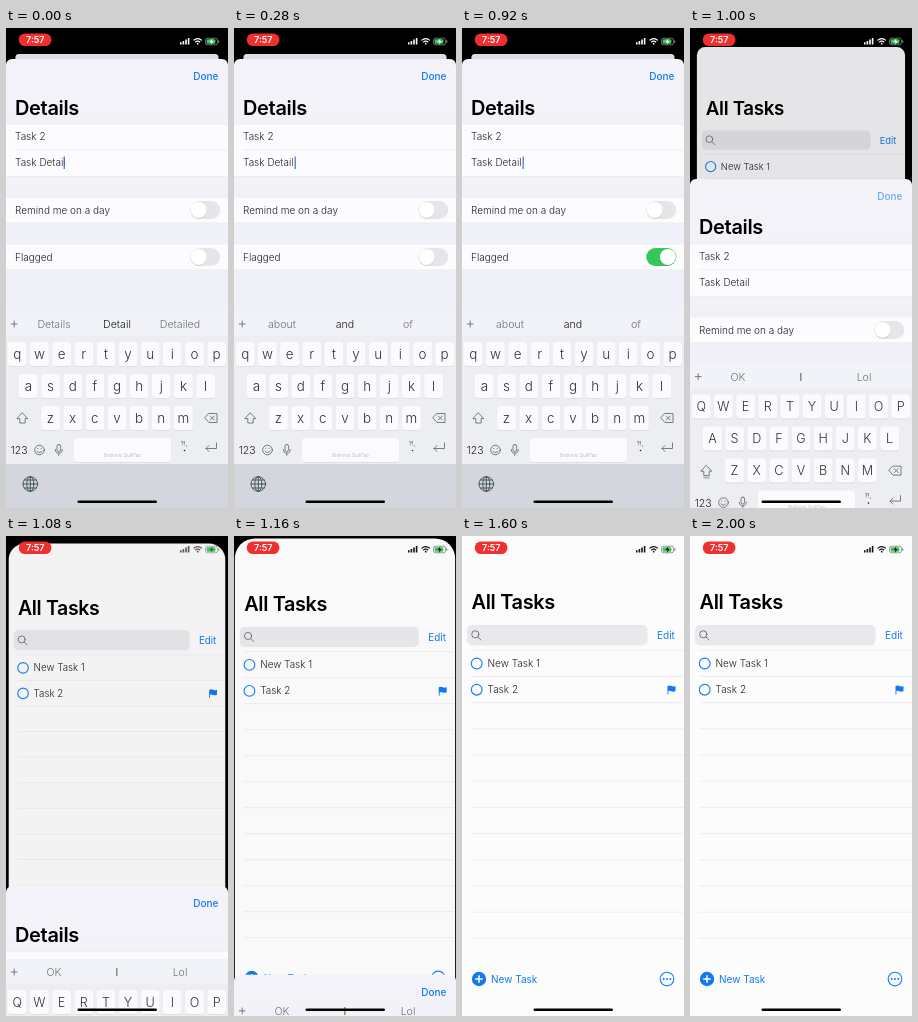
Animation of 222x480 px, one loop 2040 ms. Source, as an HTML page:

```html
<!DOCTYPE html>
<html lang="en">
<head>
<meta charset="utf-8">
<title>Task details</title>
<style>
@property --p { syntax: "<number>"; inherits: true; initial-value: 0; }
@property --knob { syntax: "<number>"; inherits: true; initial-value: 0; }
@property --green { syntax: "<number>"; inherits: true; initial-value: 0; }

html, body { margin: 0; width: 100%; height: 100%; overflow: hidden; background: #000; }
svg { display: block; width: 222px; height: 480px; font: 300 10px Inter, "Liberation Sans", sans-serif; fill: #25252a; }
svg, .anim { animation: 2040ms step-end infinite; }
svg { animation-name: dismiss, toggle; }

/* dismissal: critically damped spring, held per 40 ms */
@keyframes dismiss {
  0% { --p: 0; } 47% { --p: .025; } 49% { --p: .267; } 50.9% { --p: .52; }
  52.9% { --p: .711; } 54.9% { --p: .834; } 56.8% { --p: .908; } 58.8% { --p: .95; }
  60.7% { --p: .973; } 62.7% { --p: .986; } 64.7% { --p: .993; } 66.6% { --p: .996; }
  68.6% { --p: .998; } 70.5%, 100% { --p: 1; }
}
@keyframes toggle {
  0% { --knob: 0; --green: 0; } 19.6% { --knob: .15; --green: .08; }
  21.5% { --knob: .55; --green: .25; } 23.5% { --knob: .87; --green: .5; }
  25.4% { --knob: 1; --green: .74; } 27.4% { --knob: 1; --green: .9; }
  29.4%, 100% { --knob: 1; --green: 1; }
}

.card { --out: calc(1 - var(--p));
  transform: translate(calc(var(--out) * 9.4px), calc(var(--out) * 26px)) scale(calc(1 - .085 * var(--out))); }
.card .back, .dim { rx: min(calc(4px + var(--p) * 18px), calc(var(--out) * 400px)); }
.dim { fill: #0a0010; opacity: calc(.125 * var(--out)); }
.sheet { transform: translateY(calc(var(--p) * 449px)); }
.keyboard { transform: translateY(calc(var(--p) * 197px)); }
.flagged .on { opacity: var(--green); }
.flagged .knob { transform: translateX(calc(var(--knob) * 13.2px)); }

.title { font-size: 20px; font-weight: 600; letter-spacing: -.35px; fill: #000; }
.blue { fill: #1279f2; }
text.blue { font-weight: 400; }
.ring { fill: none; stroke: #1580fa; stroke-width: 1.15; }
.line { stroke: #e9e9ed; stroke-width: .7; }
.ink { fill: none; stroke: #5c5f65; stroke-width: .8; stroke-linecap: round; stroke-linejoin: round; }
.mid { text-anchor: middle; }
text.done { font-weight: 500; animation-name: press; }
@keyframes press { 0% { opacity: 1; } 47% { opacity: .4; } 49% { opacity: .6; } 50.9% { opacity: .8; } 52.9%, 100% { opacity: 1; } }

.caret { fill: #3f6be8; animation-name: caret; }
@keyframes caret {
  0% { transform: none; opacity: 1; } 5.8% { transform: translateX(3px); opacity: 1; }
  19.6% { transform: translateX(3px); opacity: 0; } 39.2% { transform: translateX(3px); opacity: 1; }
  47%, 100% { transform: translateX(3px); opacity: 0; }
}
.words { font-size: 10.6px; fill: #6f7177; text-anchor: middle; }
.words .best { fill: #1c1e22; }
.w1 { animation-name: w1; }
.w2 { animation-name: w2; }
.w3 { animation-name: w3; }
@keyframes w1 { 0% { opacity: 1; } 5.8%, 100% { opacity: 0; } }
@keyframes w2 { 0% { opacity: 0; } 5.8% { opacity: 1; } 47%, 100% { opacity: 0; } }
@keyframes w3 { 0% { opacity: 0; } 47%, 100% { opacity: 1; } }

.letters { font-size: 13.4px; fill: #2f3237; text-anchor: middle; animation-name: caps; }
@keyframes caps {
  0% { text-transform: none; font-size: 13.4px; }
  47%, 100% { text-transform: uppercase; font-size: 12.6px; }
}
.cap { fill: #fbfbfd; }
.edge { fill: #d9dbe1; }

.status { color: #fff; animation-name: status; }
@keyframes status { 0% { color: #fff; } 50.9% { color: #aaa; } 52.9% { color: #555; } 54.9%, 100% { color: #151515; } }
.status .fg { fill: currentColor; }
.status .arc { fill: none; stroke: currentColor; stroke-width: 1.15; }
</style>
</head>
<body>
<svg viewBox="0 0 222 480">
  <defs>
    <linearGradient id="tint" x2="0" y2="1">
      <stop stop-color="#f4f3f9"/><stop offset=".5" stop-color="#eff0f8"/>
    </linearGradient>
    <g id="switch">
      <rect x="184.3" y="-9" width="30" height="18" rx="9" fill="#e6e6e9"/>
    </g>
    <g id="knob">
      <circle cx="192.7" cy=".7" r="8.2" fill="#000" opacity=".13"/>
      <circle cx="192.7" r="8" fill="#fff"/>
    </g>
  </defs>
  <rect width="222" height="480" fill="#000"/>

  <g class="card">
    <rect class="back" width="222" height="500" fill="#fcfcfd"/>
    <text class="title" x="9.5" y="73">All Tasks</text>
    <rect x="5" y="89" width="180.5" height="20.5" rx="5" fill="#ebe8ed"/>
    <g class="ink"><circle cx="13.3" cy="98.3" r="3.6"/><path d="M16 101l3 3"/></g>
    <text class="blue" x="195" y="103">Edit</text>
    <g id="lines" class="line"></g>
    <circle class="ring" cx="14.7" cy="127.5" r="5.4"/>
    <text x="25.5" y="131">New Task 1</text>
    <circle class="ring" cx="14.7" cy="153.7" r="5.4"/>
    <text x="25.5" y="157.3">Task 2</text>
    <path class="blue" d="M205.5 150q2-1 4 0t4-.1v5.2q-2 1-4 .1t-3.1-.1v3.4h-.9z"/>
    <circle class="blue" cx="17" cy="443" r="7.2"/>
    <path d="M17 439.2v7.6M13.2 443h7.6" stroke="#fff" stroke-width="1.5"/>
    <text class="blue" x="29" y="446.7">New Task</text>
    <circle class="ring" cx="205" cy="443" r="6.8"/>
    <g class="blue"><circle cx="201.7" cy="443" r="1"/><circle cx="205" cy="443" r="1"/><circle cx="208.3" cy="443" r="1"/></g>
    <rect class="dim" width="222" height="500"/>
  </g>

  <g class="sheet">
    <rect y="31" width="222" height="470" rx="6" fill="url(#tint)"/>
    <text class="blue done anim" x="212.5" y="52" text-anchor="end">Done</text>
    <text class="title" x="9" y="86.5">Details</text>
    <g fill="#fcfcfe">
      <rect y="96" width="222" height="52.5"/><rect y="169" width="222" height="26"/><rect y="216" width="222" height="26"/>
    </g>
    <path class="line" d="M0 96H222M9 122H222M0 148.5H222M0 169H222M0 195H222M0 216H222M0 242H222"/>
    <text x="9" y="112">Task 2</text>
    <text x="9" y="138.3">Task Detail</text>
    <rect class="caret anim" x="57.6" y="128.5" width="1.2" height="12.5"/>
    <text x="9" y="185.7">Remind me on a day</text>
    <g transform="translate(0 182)"><use href="#switch"/><use href="#knob"/></g>
    <text x="9" y="232.7">Flagged</text>
    <g class="flagged" transform="translate(0 229)">
      <use href="#switch"/>
      <rect class="on" x="184.3" y="-9" width="30" height="18" rx="9" fill="#34c759"/>
      <use class="knob" href="#knob"/>
    </g>
  </g>

  <g class="keyboard">
    <rect y="283" width="222" height="200" fill="#eceef2"/>
    <rect y="283" width="222" height="25" fill="#f2f3f8"/>
    <rect y="436" width="222" height="50" fill="#d3d6dd"/>
    <path class="ink" d="M5.2 296h6M8.2 293v6"/>
    <g class="words w1 anim"><text x="48" y="300">Details</text><text class="best" x="111" y="300">Detail</text><text x="174" y="300">Detailed</text></g>
    <g class="words w2 anim"><text x="48" y="300">about</text><text class="best" x="111" y="300">and</text><text x="174" y="300">of</text></g>
    <g class="words w3 anim"><text x="48" y="300">OK</text><text class="best" x="111" y="300">I</text><text x="174" y="300">Lol</text></g>
    <g id="caps"></g>
    <g id="letters" class="letters anim"></g>
    <text class="mid" x="116.5" y="428.5" font-size="4.6" style="fill:#a9abb0">Brellonix QuillTap</text>
    <text class="mid" x="13.2" y="426" font-size="10.6">123</text>
    <g class="ink">
      <path d="M16.5 385l5.3 5.6h-2.6v4.4h-5.4v-4.4h-2.6z"/>
      <path class="w3 anim" d="M13.8 397h5.4"/>
      <path d="M203 385.5h8v9h-8l-4-4.5zM204.3 388l4 4M208.3 388l-4 4"/>
      <circle cx="33.5" cy="422" r="4.8"/>
      <path d="M31 423.3q2.5 2.8 5 0M31.8 420.3v.3M35.2 420.3v.3"/>
      <rect x="51" y="416.5" width="3.6" height="7" rx="1.8"/>
      <path d="M49.3 421.5q0 3.7 3.5 3.7t3.5-3.7M52.8 425.2v2.3"/>
      <path d="M210.5 415v5.5h-10.5M203 417.5l-3 3 3 3"/>
    </g>
    <text class="mid" x="178" y="417.5" font-size="6">?!,</text>
    <circle cx="178.5" cy="422.5" r=".8"/>
    <g class="ink" style="stroke:#2b4148">
      <circle cx="24.3" cy="456" r="7.3"/><ellipse cx="24.3" cy="456" rx="3.5" ry="7.3"/>
      <path d="M17 456h14.6M24.3 448.7v14.6M18.5 452h11.6M18.5 460h11.6"/>
    </g>
  </g>

  <rect x="71.5" y="472.4" width="79.5" height="2.7" rx="1.35" fill="#000"/>
  <g class="status anim">
    <rect x="12.7" y="5.4" width="32.8" height="12.6" rx="6.3" fill="#f0302e"/>
    <text class="mid" x="29.3" y="15.1" font-size="9" font-weight="600" style="fill:#fff">7:57</text>
    <path class="fg" d="M174 14.3h1.6v2.2h-1.6zM176.6 13h1.6v3.5h-1.6zM179.2 11.5h1.6v5h-1.6zM181.8 10h1.6v6.5h-1.6z"/>
    <path class="arc" d="M187.5 12.4q4.2-3.6 8.4 0M189.2 14.2q2.5-2.1 5 0"/>
    <circle class="fg" cx="191.7" cy="15.7" r=".9"/>
    <rect x="199.5" y="10.2" width="12" height="6.6" rx="2" fill="none" stroke="currentColor" stroke-width=".7" opacity=".6"/>
    <rect x="200.6" y="11.3" width="8.8" height="4.4" rx="1" fill="#38cc5c"/>
    <path class="fg" d="M206.5 10l-3 4h2l-.9 3.2 3.1-4.2h-2z"/>
    <rect class="fg" x="212.3" y="12.2" width="1" height="2.5" rx=".5" opacity=".6"/>
  </g>
</svg>
<script>
const $ = id => document.getElementById(id);

function add(parent, tag, attrs, text = "") {
  const el = document.createElementNS("http://www.w3.org/2000/svg", tag);
  for (const name in attrs) el.setAttribute(name, attrs[name]);
  el.textContent = text;
  parent.append(el);
}

function key(x, y, width) {
  const box = { x, width, height: 24, rx: 3 };
  add($("caps"), "rect", { ...box, y: y + .8, class: "edge" });
  add($("caps"), "rect", { ...box, y, class: "cap" });
}

["qwertyuiop", "asdfghjkl", "zxcvbnm"].forEach((row, r) => {
  [...row].forEach((letter, i) => {
    const x = [11.3, 22.4, 44.5][r] + i * 22.15, y = 314 + r * 32;
    key(x - 9.4, y, 18.8);
    add($("letters"), "text", { x, y: y + 16.5 }, letter);
  });
});
key(68, 410, 97);

for (let i = 0; i < 12; i++) {
  const y = 114.2 + i * 26.2;
  add($("lines"), "line", { x1: 9, x2: 222, y1: y, y2: y });
}
</script>
</body>
</html>
```
